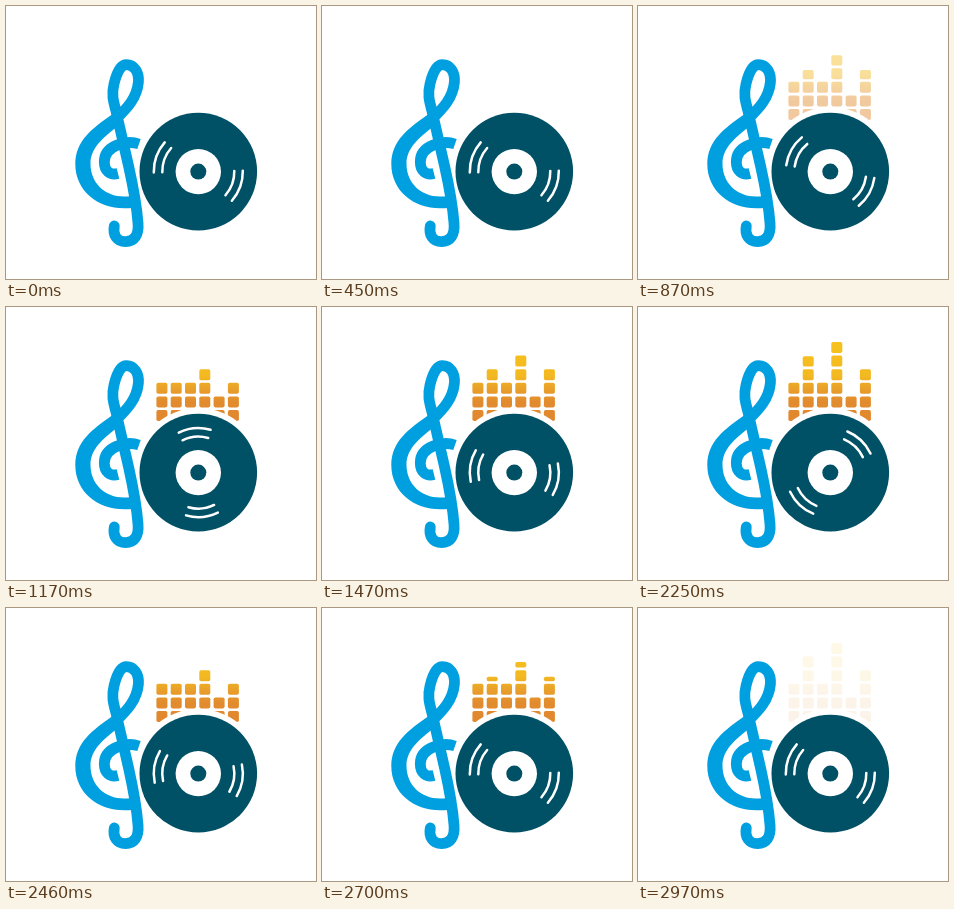
An HTML page for the animation above (3 s loop, 310 by 273 pixels).

```html
<!DOCTYPE html>
<html lang="en">
<head>
<meta charset="utf-8">
<title>Music</title>
<style>
  html, body { margin: 0; width: 100%; height: 100%; overflow: hidden; background: #fff; }
  svg { display: block; width: 100vw; height: 100vh; }
</style>
</head>
<body>
<svg viewBox="0 0 310 273">
  <defs>
    <linearGradient id="warm" gradientUnits="userSpaceOnUse" x1="0" y1="35" x2="0" y2="115">
      <stop offset="0" stop-color="#f7c21b"/>
      <stop offset=".42" stop-color="#f3b921"/>
      <stop offset=".6" stop-color="#e89e2b"/>
      <stop offset=".75" stop-color="#e28b2e"/>
      <stop offset="1" stop-color="#e1872f"/>
    </linearGradient>
  </defs>
  <g id="bars" fill="url(#warm)"></g>
  <circle cx="192.300" cy="165.600" r="64.500" fill="#fff"/>
  <g fill="none" stroke="#009fe0" stroke-width="10.800">
    <path stroke-linecap="round" d="M108.300 220 C106.500 229 111 235.700 119.500 235.700 C128.500 235.700 133 229 132 217 C131 204 127 180 122.800 161 L110 105 C107 94 105.500 88 108 78 C110.500 67 114.500 58.600 120.500 58.600 C128 58.600 133.200 66 132.400 76 C131 92 121 102.500 110 113"/>
    <path d="M133 138 C121 134 98.300 139 98.300 156 C98.300 165 104 169.500 112 167.500"/>
  </g>
  <path fill="#009fe0" d="M106 108.400 C87 122 69.300 134 69.300 158 C69.300 185 92 202.300 118 202.300 C124 202.300 130 202 134.500 200.500 L132.500 189 C127 190.500 122 190.500 118 190.500 C99 190.500 84.500 177 84.500 158 C84.500 140 100 130 115 117.500Z"/>
  <g id="disc" fill="#005066">
    <circle r="58.800"/>
    <g id="grooves" fill="none" stroke="#fff" stroke-width="2.500" stroke-linecap="round"></g>
    <circle r="22.700" fill="#fff"/>
    <circle r="8"/>
  </g>
</svg>
<script>
const LOOP = 3000;
const ROW_COUNT = 6, ROW_TOP = 35, ROW_PITCH = 13.6, CELL = 11;
const REST_ANGLE = 20, TURN = 540;

// Each column has a full height in cells; some also follow the bouncing level.
const COLUMNS = [
  { cells: 3 },
  { cells: 5, lift: 0 },
  { cells: 3, lift: 0 },
  { cells: 6, lift: 14.7 },
  { cells: 2 },
  { cells: 4, lift: 0 }
];

// Turning points of the level: [time, y]
const LEVEL = [
  [690, 80], [1050, 48], [1260, 95], [1560, 48],
  [1915, 99], [2240, 48], [2560, 87], [2860, 48]
];

const clamp = v => Math.min(1, Math.max(0, v));
const progress = (t, from, to) => clamp((t - from) / (to - from));

// Distance covered when speed rises evenly from 0 to 1 between two times.
function ramp(t, from, to) {
  if (t < from) return 0;
  return t < to ? (t - from) ** 2 / (2 * (to - from)) : t - (from + to) / 2;
}

const spin = t => ramp(t, 690, 1385) - ramp(t, 2240, 2602);

function levelAt(t) {
  let i = 0;
  while (i < LEVEL.length - 2 && t > LEVEL[i + 1][0]) i++;
  const [t0, y0] = LEVEL[i], [t1, y1] = LEVEL[i + 1];
  return y0 + (y1 - y0) * progress(t, t0, t1);
}

function add(parent, tag, attrs) {
  const node = document.createElementNS('http://www.w3.org/2000/svg', tag);
  for (const key in attrs) node.setAttribute(key, attrs[key]);
  return parent.appendChild(node);
}

const bars = document.getElementById('bars');
const disc = document.getElementById('disc');
const grooves = document.getElementById('grooves');
disc.setAttribute('transform', 'translate(192.3 165.6)');

COLUMNS.forEach((column, col) => {
  column.rects = [];
  for (let row = ROW_COUNT - column.cells; row < ROW_COUNT; row++) {
    const y = ROW_TOP + row * ROW_PITCH;
    const node = add(bars, 'rect', { x: 150.4 + col * 14.3, y, width: CELL, height: CELL, rx: 1.8 });
    column.rects.push({ node, y });
  }
});

for (const radius of [36, 44.5]) {
  for (const side of [0, 180]) {
    const point = deg => {
      const a = (side + deg) * Math.PI / 180;
      return `${radius * Math.cos(a)} ${radius * Math.sin(a)}`;
    };
    add(grooves, 'path', { d: `M${point(-21)} A${radius} ${radius} 0 0 1 ${point(21)}` });
  }
}

function render(t) {
  const angle = REST_ANGLE + TURN * spin(t) / spin(LOOP);
  grooves.setAttribute('transform', `rotate(${angle})`);
  bars.setAttribute('opacity', progress(t, 735, 1035) * (1 - progress(t, 2700, 3000)));
  const level = levelAt(t);
  for (const { lift, rects } of COLUMNS) {
    if (lift === undefined) continue;
    for (const { node, y } of rects) {
      const top = Math.max(y, level - lift);
      node.setAttribute('y', top);
      node.setAttribute('height', Math.max(0, y + CELL - top));
    }
  }
}

const start = performance.now();
function tick() {
  render((performance.now() - start) % LOOP);
  requestAnimationFrame(tick);
}
tick();
</script>
</body>
</html>
```
